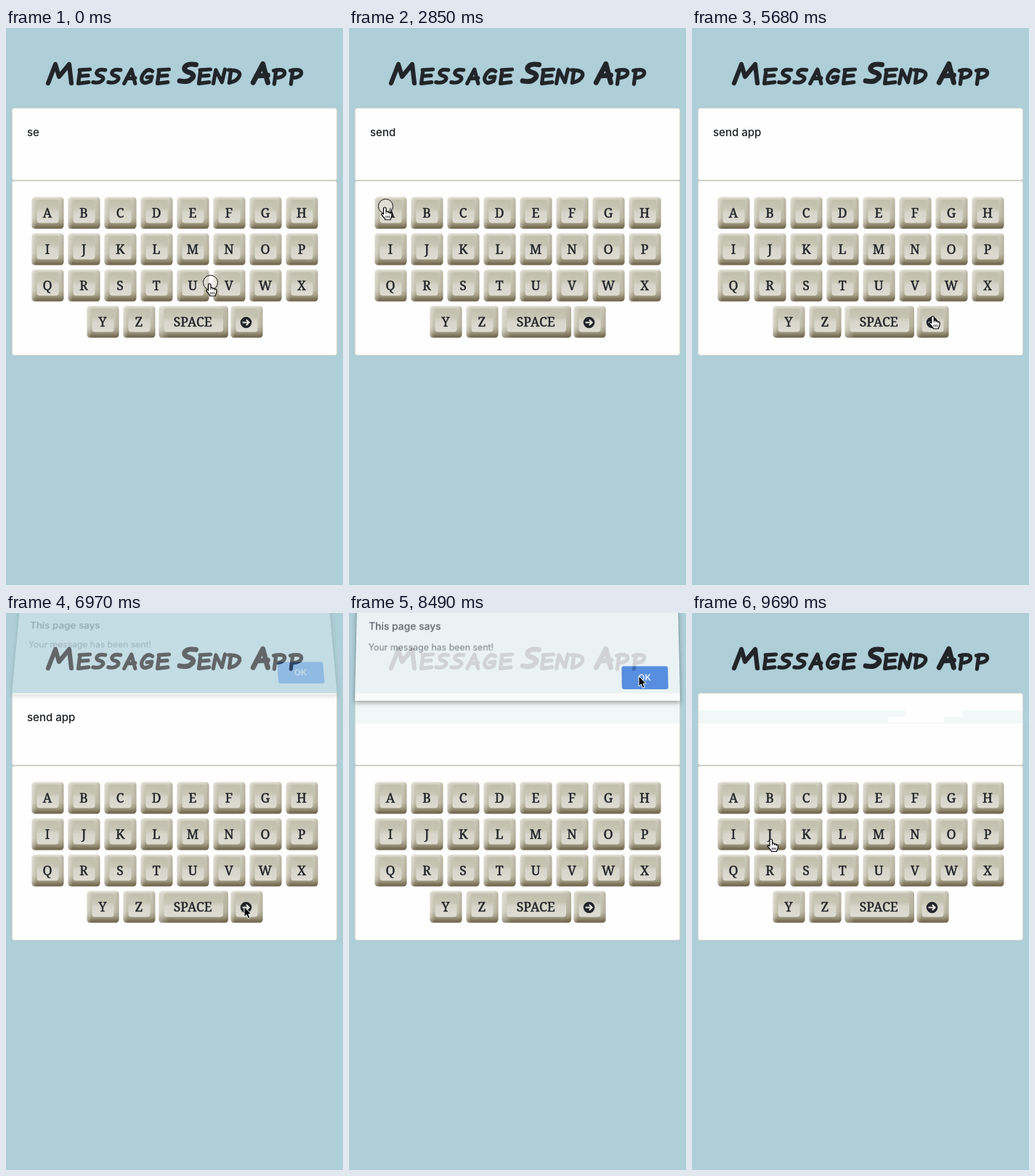
An HTML page that plays this animation: 464 px wide and 767 px high, repeating every 9790 ms.

```html
<!DOCTYPE html>
<html lang="en">
<head>
<meta charset="utf-8">
<title>Message Send App</title>
<style>
  html, body { margin: 0; width: 100%; height: 100%; overflow: hidden; background: #aeced8; }
  svg { position: absolute; left: 0; top: 0; overflow: visible; }
  .card { fill: #fefefe; stroke: #dadacf; }
  .marker { fill: none; stroke: #212529; stroke-width: 6.2; stroke-linecap: round; stroke-linejoin: round; }
  .key text {
    font: 500 17.5px "Noto Serif", serif; text-anchor: middle;
    fill: #212529; stroke: #212529; stroke-width: .5;
  }
  #typed { font: 500 15px Inter, sans-serif; fill: #1b1e21; }
  #dialog {
    position: absolute; left: 8px; top: -20px; width: 448px; height: 144px;
    background: #f8fbfb; transform-origin: 50% 100%;
    box-shadow: 0 0 1px rgba(0,0,0,.45), 0 3px 6px rgba(0,0,0,.4);
  }
  #dialog text { font-family: Inter, sans-serif; }
  #press { fill: #4a8af4; }
</style>
</head>
<body>
<svg id="page" width="464" height="767">
  <defs>
    <linearGradient id="side" x2="0" y2="1">
      <stop offset="0" stop-color="#e6e4d9"/>
      <stop offset=".1" stop-color="#c9c7b7"/>
      <stop offset=".65" stop-color="#c1beaa"/>
      <stop offset=".8" stop-color="#a8a38b"/>
      <stop offset=".93" stop-color="#7d745a"/>
      <stop offset="1" stop-color="#6c634c"/>
    </linearGradient>
    <linearGradient id="shade">
      <stop offset="0" stop-color="#fff" stop-opacity=".4"/>
      <stop offset=".14" stop-color="#fff" stop-opacity="0"/>
      <stop offset=".88" stop-color="#5e553c" stop-opacity="0"/>
      <stop offset="1" stop-color="#5e553c" stop-opacity=".18"/>
    </linearGradient>
    <linearGradient id="face" x2="0" y2="1">
      <stop offset="0" stop-color="#c1bfab"/>
      <stop offset=".4" stop-color="#cac8b8"/>
      <stop offset=".55" stop-color="#d7d6cb"/>
      <stop offset="1" stop-color="#dedcd2"/>
    </linearGradient>
  </defs>
  <g id="title" class="marker" role="img" aria-label="Message Send App"></g>
  <rect class="card" x="8.5" y="110.5" width="447" height="99" rx="3"/>
  <rect class="card" x="8.5" y="210.5" width="447" height="240" rx="3"/>
  <path d="M9 210H455" stroke="#d3d2c4" stroke-width="2"/>
  <text id="typed" x="29" y="149"></text>
  <g id="haze">
    <rect id="band" width="464" fill="#b4d7d6" fill-opacity=".16"/>
    <path id="wiped" d="M293 134H373V143H347V151H270V143H293Z" fill="#fefefe"/>
  </g>
  <g id="keys"></g>
</svg>

<div id="dialog">
  <svg width="448" height="144" viewBox="8 -20 448 144">
    <text x="25" y="25" font-size="14" font-weight="500" fill="#42464a">This page says</text>
    <text x="25" y="54" font-size="12.5" fill="#6b6e70">Your message has been sent!</text>
    <rect id="press" x="376" y="76" width="64" height="32" rx="3"/>
    <text x="407.5" y="96" font-size="12" font-weight="600" fill="#fff" text-anchor="middle">OK</text>
  </svg>
</div>

<svg width="464" height="767">
  <g id="cursor">
    <circle id="ring" r="10" fill="#fff" fill-opacity=".45" stroke="#111"/>
    <g id="hand" stroke="#000" stroke-linejoin="round">
      <path fill="#fff" stroke-width="1.2" d="M-3 11V3.5Q-3 1.5-1.2 1.5T.6 3.5V7Q2.6 6.4 3.4 8 5 7.4 6 9 8.4 8.6 8.4 11V13L6.5 18.5H-.5Q-1 16.5-5 12.5-6.5 10.5-5 9.8-4 9.6-3 11Z"/>
      <path stroke-width=".9" d="M.6 7V10M3.4 8V10M6 9V11M.5 13V16M2.7 13V16M4.9 13V16"/>
    </g>
    <path id="arrow" stroke="#fff" d="M0 0V14L3.2 11 5.4 16.2 8 15.2 5.8 10.2H10Z"/>
    <g id="beam" fill="none">
      <path stroke="#fff" stroke-width="2.5" d="M-3-8Q0-8 0-6 0-8 3-8M0-6V6M-3 8Q0 8 0 6 0 8 3 8M-2 3H2"/>
      <path stroke="#000" d="M-3-8Q0-8 0-6 0-8 3-8M0-6V6M-3 8Q0 8 0 6 0 8 3 8M-2 3H2"/>
    </g>
  </g>
</svg>

<script>
const $ = id => document.getElementById(id);
const LOOP = 9790;

// Hand-lettered heading in small capitals
const strokes = {
  M: 'M3 30 13 4 18 21 32 4 35 30',
  E: 'M6 4 3 26M5 4 22 3M5 14 19 13M3 26 20 24',
  S: 'M21 4Q9 2 7 8 6 12 14 14 21 17 15 22 11 26 1 24',
  A: 'M2 26 14 3 20 26M6 18 20 17',
  G: 'M21 6Q14 1 8 8 1 16 4 22 8 28 18 22L20 15 12 16',
  N: 'M3 26 7 4 17 24 22 3',
  D: 'M7 4 4 25M3 4Q23 4 21 13 18 22 4 25',
  P: 'M7 4 4 27M3 5Q21 1 21 9 20 16 6 17'
};
function letter(ch, x, y = 46, scale = 1.12) {
  return `<path d="${strokes[ch]}" transform="translate(${x} ${y}) scale(${scale})"/>`;
}
const small = (word, xs) => [...word].map((ch, i) => letter(ch, xs[i], 54.5, .84)).join('');
$('title').innerHTML =
  letter('M', 55, 46, 1) + small('ESSAGE', [97, 119, 140, 161, 184, 206]) +
  letter('S', 238, 46) + small('END', [263, 283, 304]) +
  letter('A', 338, 46) + small('PP', [366, 389]);

// Keyboard
function key(label, x, y, w = 44) {
  const cap = label === '>'
    ? `<circle cx="21" cy="23" r="7.8" fill="#212529"/>
       <path d="M16 23H24.500M21.300 19.200 25.100 23 21.300 26.800" fill="none" stroke="#e6e5dd" stroke-width="2"/>`
    : `<text x="${label.length > 1 ? w / 2 - 1 : w / 2 - .5}" y="28.500">${label}</text>`;
  return `<g class="key" transform="translate(${x} ${y})">
    <rect width="${w}" height="44" rx="4.5" fill="url(#side)"/>
    <rect width="${w}" height="44" rx="4.5" fill="url(#shade)"/>
    <rect x="7" y="4" width="${w - 14}" height="32" rx="4" fill="url(#face)"/>
    <path d="M${w * .45} 5H${w - 9}Q${w - 7} 5 ${w - 7} 9V17H${w * .7}V13H${w * .45}Z" fill="#c2c1ad" opacity=".5"/>
    ${cap}</g>`;
}
$('keys').innerHTML =
  [...'ABCDEFGHIJKLMNOPQRSTUVWX'].map((ch, i) =>
    key(ch, 35.5 + i % 8 * 50, 232.5 + Math.floor(i / 8) * 50)).join('') +
  key('Y', 111.5, 382.5) + key('Z', 161.5, 382.5) +
  key('SPACE', 210.5, 382.5, 95.5) + key('>', 309.5, 382.5);

// Pointer path: start, end, x, y and an optional bend
const moves = [
  [30, 300, 310.5, 311.5],
  [660, 1320, 207, 261.5],
  [1620, 2060, 243, 401],
  [2320, 2760, 50.5, 245.5],
  [3000, 3600, 392.5, 304, 215, 348],
  [5330, 5960, 330, 405, 344, 350],
  [6199, 6200, 329.5, 405],
  [6969, 6970, 328, 404.5],
  [7150, 7840, 399, 87],
  [8930, 9690, 110, 310]
];
const clicks = [[0, 30], [450, 660], [1470, 1620], [2140, 2320], [2850, 3000],
  [3840, 3960], [4860, 5030], [6830, 6970], [8340, 8490]];
const typing = [[0, 'se'], [660, 'sen'], [1620, 'send'], [3000, 'send a'],
  [3960, 'send ap'], [5030, 'send app'], [8490, '']];

const easeOut = p => 1 - (1 - p) ** 3;

function pointerAt(t) {
  let x = 281.5, y = 350.5;
  for (const [start, end, toX, toY, bendX = (x + toX) / 2, bendY = (y + toY) / 2] of moves) {
    if (t < start) break;
    const u = easeOut(Math.min(1, (t - start) / (end - start))), v = 1 - u;
    x = v * v * x + 2 * u * v * bendX + u * u * toX;
    y = v * v * y + 2 * u * v * bendY + u * u * toY;
  }
  return [x, y];
}

const show = (id, on) => { $(id).style.display = on ? '' : 'none'; };

function drawDialog(t) {
  const open = t >= 6970 && t < 8630;
  show('dialog', open);
  if (!open) return;
  let away = 0;
  if (t < 7090) away = .7 * (1 - (t - 6970) / 120);
  if (t >= 8490) away = (t - 8460) / 170;
  const style = $('dialog').style;
  style.opacity = 1 - away;
  style.transform = away
    ? `translateY(${-17 * away}px) perspective(800px) rotateX(${26 * away}deg)` : 'none';
  $('press').style.fill = t >= 8340 ? '#437fe2' : '#4a8af4';
}

function draw(t) {
  const [x, y] = pointerAt(t);
  $('typed').textContent = typing.filter(([at]) => t >= at).pop()[1];

  show('haze', t >= 8490);
  const top = t < 8630 ? 122 : 134;
  $('band').setAttribute('y', top);
  $('band').setAttribute('height', 152 - top);
  show('wiped', t > 8930 && y > 140);

  drawDialog(t);

  let kind = 'hand';
  if (t >= 6970 && t < 8630) kind = 'arrow';
  else if (y < 100) kind = 'beam';
  else if (y < 232) kind = 'arrow';
  for (const id of ['hand', 'arrow', 'beam']) show(id, id === kind);
  show('ring', clicks.some(([from, to]) => t >= from && t < to));
  $('cursor').setAttribute('transform', `translate(${x.toFixed(1)} ${y.toFixed(1)})`);
}

const begin = performance.now();
function tick() {
  draw((performance.now() - begin) % LOOP);
  requestAnimationFrame(tick);
}
tick();
</script>
</body>
</html>
```
